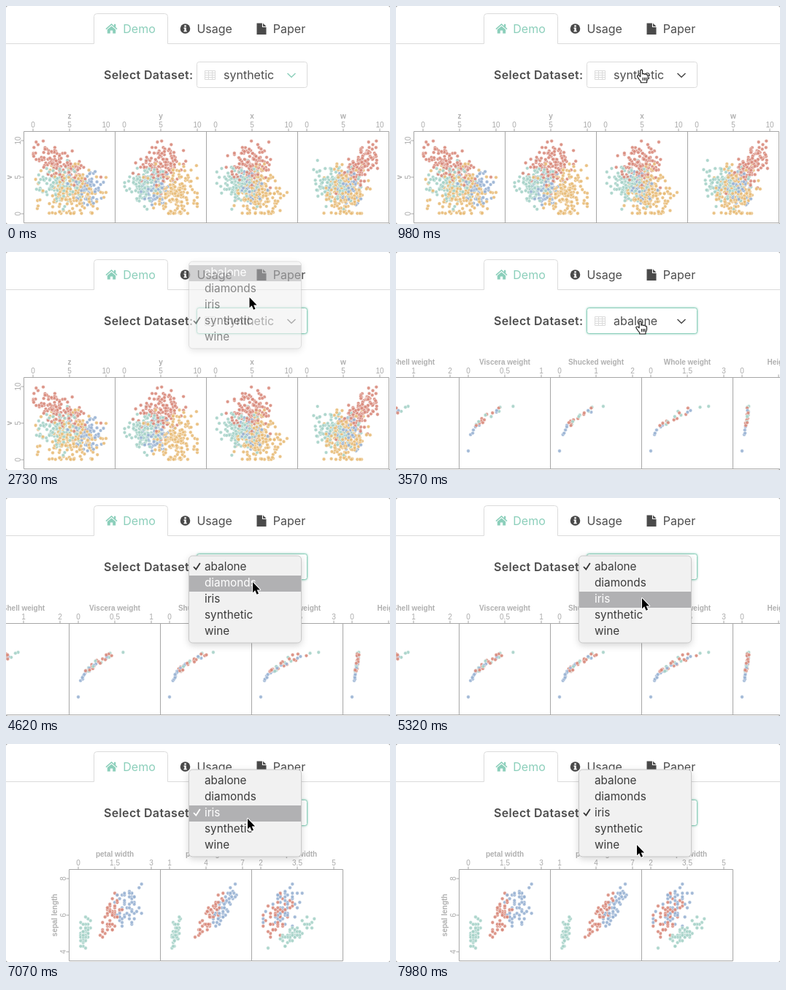
Animation of 526x298 px, one loop 8 s. Source, as an HTML page:

```html
<!DOCTYPE html>
<html lang="en">
<head>
<meta charset="utf-8">
<title>Scatterplot matrix demo</title>
<style>
  html, body { margin: 0; width: 100%; height: 100%; overflow: hidden; background: #999; }
  svg { display: block; width: 526px; height: 298px; background: #fff; border-radius: 3px; }
  text { font: 16px Inter, Roboto, sans-serif; fill: #4d4d4d; white-space: pre; }
  .bold { font-weight: 600; letter-spacing: .35px; }
  .teal { fill: #8ccfbb; }
  .mid { text-anchor: middle; }
  .dark { fill: #4a4a4a; }
  .line { fill: none; stroke: #dbdbdb; }
  .plot text { font: 10px "Liberation Sans", Arial, sans-serif; fill: #aaa; text-anchor: middle; }
  .plot .name { font-weight: 700; fill: #b0b0b0; }
  .plot path { fill: none; stroke: #a6a6a6; }
  .plot circle { stroke: #fff; stroke-width: .5; opacity: .9; }
  #menu text { font-size: 15.3px; fill: #3b3b3b; }
  #menu text.on { fill: #fff; }
  #panel { fill: #f1f1f1; stroke: #c8c8c8; filter: drop-shadow(0 3px 5px rgba(0, 0, 0, .16)); }
  #bar { fill: #b1b1b3; }
  #check { fill: none; stroke: #333; stroke-width: 1.8; }
  #check.on { stroke: #fff; }
  #box { fill: #fff; stroke: #dbdbdb; }
  #box.focus { stroke: #8ccfbb; filter: drop-shadow(0 0 1.5px #8ccfbb); }
  #chevron { fill: none; stroke: #8ccfbb; stroke-width: 1.4; }
  #chevron.hover { stroke: #444; }
</style>
</head>
<body>
<svg id="stage" viewBox="0 0 526 298">
  <!-- tabs -->
  <path class="line" d="M0 51.5H120.5V14.5Q120.5 10.5 124.5 10.5H217.5Q221.5 10.5 221.5 14.5V51.5H526"/>
  <path class="teal" d="M144.5 24L152.5 31L151.5 32.2L144.5 26.1L137.5 32.2L136.5 31L141 27.1L144.5 24ZM148 24.7H150.3V29L148 27ZM144.5 27.4L150.2 32.3V37.5H146.2V33.5H142.8V37.5H138.8V32.3Z"/>
  <text class="teal" x="160.3" y="37">Demo</text>
  <circle class="dark" cx="245.5" cy="31" r="6.8"/>
  <path fill="#fff" d="M244.3 26.3H246.8V28.4H244.3ZM243.5 29.6H246.8V33.8H247.7V35.3H243.5V33.8H244.4V31.1H243.5Z"/>
  <text x="261.4" y="37">Usage</text>
  <path class="dark" d="M343.5 23.5H350.9V28.9H356.5V39H343.5ZM352 23.5L356.5 27.9H352Z"/>
  <text x="365.8" y="37">Paper</text>

  <g id="plots"></g>

  <g id="loader">
    <rect id="loadBox" y="136" height="64" rx="4" fill="#f5f5f5"/>
    <g id="spinner"></g>
    <text id="loadText" y="174"></text>
  </g>

  <!-- dataset select -->
  <text class="bold" x="134" y="100">Select Dataset:</text>
  <rect id="box" x="261.5" y="76.5" width="151" height="35" rx="3"/>
  <path class="line" d="M272.5 88.5H286.5V100.5H272.5ZM272 91.5H287M272 94.5H287M272 97.5H287M277.5 89V101M282.5 89V101"/>
  <text id="choice" x="298" y="100"></text>
  <path id="chevron" d="M385.5 92L391 97.3L396.5 92"/>

  <g id="menu">
    <rect id="panel" x="250.5" y="0" width="154" height="119" rx="5"/>
    <rect id="bar" x="251" width="153" height="22"/>
    <path id="check" d="M257 15L260.3 18.5L265.8 10"/>
  </g>

  <g id="cursor" stroke-linejoin="round">
    <path id="arrow" fill="#000" stroke="#fff" stroke-width="2" paint-order="stroke"
      d="M0 0V14.2L3.2 11.3L5.6 16.8L8 15.8L5.7 10.4H10.1Z"/>
    <path id="hand" fill="#fff" stroke="#222" stroke-width="1.2"
      d="M-1.4 9V1.3Q0-.7 1.4 1.3V6.2Q3 5 4.2 6.6Q6 5.6 7 7.3Q9 6.8 9 9.2V12Q8.6 14.5 7.4 16V18H-.8V16.3Q-3.4 13.4-5.6 9.8Q-6 8-4.2 8Q-2.8 8-1.4 9.8ZM2 11V15M4.3 11V15M6.4 11V15"/>
  </g>
</svg>
<script>
const LOOP = 8000, STEP = 70, TOP = 171.5, SIZE = 125, PAD = 12.5;
const TEAL = '#a6d2c8', YELLOW = '#e8bc78', CORAL = '#d98a7c', BLUE = '#98b2d3';
const ITEMS = ['abalone', 'diamonds', 'iris', 'synthetic', 'wine'];
const $ = id => document.getElementById(id);

function add(parent, tag, attrs, text) {
  const el = document.createElementNS('http://www.w3.org/2000/svg', tag);
  for (const k in attrs) el.setAttribute(k, attrs[k]);
  if (text !== undefined) el.textContent = text;
  parent.appendChild(el);
  return el;
}
const show = (el, on) => { el.style.display = on ? '' : 'none'; };
const clamp = (v, a, b) => Math.min(b, Math.max(a, v));

let seed = 11;
function rand() {
  seed = (seed + 0x6D2B79F5) | 0;
  let r = Math.imul(seed ^ seed >>> 15, 1 | seed);
  r = r + Math.imul(r ^ r >>> 7, 61 | r) ^ r;
  return ((r ^ r >>> 14) >>> 0) / 4294967296;
}
const gauss = () =>
  clamp(Math.sqrt(-2 * Math.log(rand() + 1e-9)) * Math.cos(2 * Math.PI * rand()), -2.6, 2.6);

// One row: y value first, then one x value per column, each correlated with y.
function sample({ y, x, sd, corr }) {
  const g = gauss();
  return [y[0] + y[1] * g, ...x.map((m, i) =>
    m + sd[i] * (corr[i] * g + Math.sqrt(1 - corr[i] ** 2) * gauss()))];
}

// Axes with cols = [name, tick, tick, tick]; rows hold pixel offsets inside each panel.
function makePlot(x0, cols, yAxis, rows) {
  const g = add($('plots'), 'g', { class: 'plot' });
  const width = SIZE * cols.length;
  let d = `M${x0} ${TOP}h${width}M${x0} ${TOP + SIZE}h${width}`;
  for (let i = 0; i <= cols.length; i++) d += `M${x0 + i * SIZE} ${TOP}v${SIZE}`;
  cols.forEach(([name, ...ticks], i) => {
    const left = x0 + i * SIZE;
    add(g, 'text', { class: 'name', x: left + SIZE / 2, y: 154 }, name);
    ticks.forEach((tick, k) => {
      const x = left + PAD + k * 50;
      add(g, 'text', { x, y: 166 }, tick);
      d += `M${x} ${TOP}v-4`;
    });
  });
  if (yAxis) {
    const [name, ...ticks] = yAxis;
    const side = (x, y, cls, s) =>
      add(g, 'text', { class: cls, transform: `translate(${x} ${y}) rotate(-90)` }, s);
    side(x0 - 17, TOP + SIZE / 2, 'name', name);
    ticks.forEach((tick, k) => {
      const y = TOP + SIZE - PAD - k * 50;
      side(x0 - 5, y, '', tick);
      d += `M${x0} ${y}h-4`;
    });
  }
  add(g, 'path', { d });
  const marks = rows.map(({ color, off }) => {
    const row = add(g, 'g', { fill: color });
    off.slice(1).forEach((x, i) => add(row, 'circle', {
      cx: (x0 + i * SIZE + PAD + x).toFixed(1),
      cy: (TOP + SIZE - PAD - off[0]).toFixed(1), r: 2.4
    }));
    return row;
  });
  return { g, marks };
}

function syntheticRows() {
  const none = [0, 0, 0, 0];
  const blue = { color: BLUE, y: [3.5, 1], x: [7.6, 4.6, 5, 5.7], sd: [1.1, 1, 1, 1], corr: none };
  const teal = { color: TEAL, y: [4, 1.3], x: [3.9, 3, 3.3, 3.8], sd: [1.5, 1.2, 1.2, 1.4], corr: none };
  const yellow = { color: YELLOW, y: [2.9, 1.5], x: [5.2, 6.8, 5.9, 5.3], sd: [1.9, 1.6, 1.5, 1.3], corr: none };
  const coral = { color: CORAL, y: [6.4, 1.4], x: [4.2, 4.7, 4.8, 7.3], sd: [2, 1.4, 1.3, 1.2], corr: [-.7, .15, 0, .6] };
  const order = [blue, teal, yellow, coral, teal, yellow, coral, yellow];
  return Array.from({ length: 520 }, (_, i) => {
    const c = order[i % order.length];
    return { color: c.color, off: sample(c).map(v => clamp(v, .05, 10) * 10) };
  });
}

function abaloneRows() {
  const spans = [40, 54, 57, 70];
  return Array.from({ length: 40 }, (_, i) => {
    const s = i === 0 ? 0 : i < 8 ? .33 + .035 * i : .57 + .43 * ((i - 8) / 31) ** 1.4;
    const color = i < 8 ? BLUE : [TEAL, CORAL, TEAL, BLUE, CORAL][Math.floor(rand() * 5)];
    const grow = span => span * s ** 2.5 * (.7 + .45 * rand());
    return { color, off: [12 + 61 * s, ...spans.map(grow), 10 * s * (.7 + .4 * rand())] };
  }).sort(() => rand() - .5);
}

function irisRows() {
  const low = [4, 0, 1, 2], range = [4, 3, 6, 3];
  const groups = [
    { color: TEAL, y: [5.01, .35], x: [.25, 1.46, 3.43], sd: [.1, .17, .38], corr: [.28, .27, .74] },
    { color: BLUE, y: [6.59, .64], x: [2.03, 5.55, 2.97], sd: [.27, .55, .32], corr: [.28, .86, .46] },
    { color: CORAL, y: [5.94, .5], x: [1.33, 4.26, 2.77], sd: [.2, .47, .31], corr: [.55, .75, .53] }
  ];
  return Array.from({ length: 150 }, (_, i) => {
    const c = groups[i % 3];
    return {
      color: c.color,
      off: sample(c).map((v, k) =>
        (clamp(Math.round(v * 10) / 10, low[k] + .1, low[k] + range[k] - .1) - low[k]) / range[k] * 100)
    };
  });
}

// from: loading starts; ready: points begin; full: all points drawn
const sets = [
  { name: 'synthetic', from: -1, ready: -1, full: -1,
    ...makePlot(24.5, [['z', 0, 5, 10], ['y', 0, 5, 10], ['x', 0, 5, 10], ['w', 0, 5, 10]],
      ['v', 0, 5, 10], syntheticRows()) },
  { name: 'abalone', from: 2940, ready: 3150, full: 3900, size: '4177 rows and 8 columns', left: 78,
    ...makePlot(-38.5, [['Shell weight', 0, 1, 2], ['Viscera weight', 0, .5, 1],
      ['Shucked weight', 0, 1, 2], ['Whole weight', 0, 1.5, 3], ['Height', 0, '', 1]],
      null, abaloneRows()) },
  { name: 'iris', from: 5670, ready: 5880, full: 6580, size: '150 rows and 4 columns', left: 82,
    ...makePlot(86.5, [['petal width', 0, 1.5, 3], ['petal length', 1, 4, 7], ['sepal width', 2, 3.5, 5]],
      ['sepal length', 4, 6, 8], irisRows()) }
];

// picked: chosen item; blink: highlight off just before the fade
const menus = [
  { open: 1120, checked: 3, picked: 0, blink: 2520, fade: 2590, end: 2940 },
  { open: 4060, checked: 0, picked: 2, blink: 5250, fade: 5320, end: 5670 },
  { open: 6790, checked: 2, picked: 4, blink: 7980, fade: LOOP, end: LOOP + 1 }
];

const path = [
  [70, 344, -24], [700, 338, 86], [1120, 335.5, 87], [1900, 335.5, 87], [2380, 337, 26],
  [2590, 337, 26], [2730, 333.5, 62], [2940, 334, 93], [4200, 335, 95], [4550, 338, 115],
  [4700, 338, 115], [5040, 337, 137], [5320, 337, 137], [5600, 332.5, 135], [5900, 332.5, 135],
  [6500, 331, 96], [7070, 331, 102], [7280, 331, 102], [7770, 330, 138], [8000, 330, 138]
];
const handTimes = [[630, 1120], [2940, 4060], [5670, 6790]];

function cursorAt(t) {
  let i = 0;
  while (i < path.length - 2 && t >= path[i + 1][0]) i++;
  const [a, ax, ay] = path[i], [b, bx, by] = path[i + 1];
  const p = clamp((t - a) / (b - a), 0, 1), e = p * p * (3 - 2 * p);
  return [ax + (bx - ax) * e, ay + (by - ay) * e];
}

const labels = ITEMS.map((s, i) => add($('menu'), 'text', { x: 272, y: 19.6 + i * 22 }, s));
for (let i = 0; i < 8; i++) {
  const a = i * Math.PI / 4;
  add($('spinner'), 'circle', {
    cx: 6 * Math.cos(a), cy: 6 * Math.sin(a), r: 1.1 + i * .09, class: 'dark'
  });
}

function drawMenu(t, y) {
  const m = menus.find(m => t >= m.open && t < m.end);
  show($('menu'), m);
  if (!m) return;
  const top = 79 - 22 * m.checked;
  let on = Math.floor((y - top - 5) / 22);
  if (t >= m.blink) on = t < m.fade ? -1 : m.picked;
  $('menu').setAttribute('transform', `translate(0 ${top})`);
  $('menu').setAttribute('opacity', t < m.fade ? 1 : 1 - (t - m.fade) / (m.end - m.fade));
  show($('bar'), on >= 0 && on < ITEMS.length);
  $('bar').setAttribute('y', 5 + on * 22);
  labels.forEach((el, i) => el.classList.toggle('on', i === on));
  $('check').setAttribute('transform', `translate(0 ${m.checked * 22})`);
  $('check').classList.toggle('on', m.checked === on);
}

function draw(t) {
  const set = sets.filter(s => t >= s.from).pop();
  const loading = t < set.ready;
  sets.forEach(s => show(s.g, s === set));
  set.g.setAttribute('transform', `translate(0 ${loading ? 88 : 0})`);
  const share = loading ? 0 : t >= set.full ? 1 : (t - set.ready + STEP) / (set.full - set.ready + STEP);
  set.marks.forEach((row, i) => show(row, i < share * set.marks.length));

  show($('loader'), loading);
  if (loading) {
    $('loadBox').setAttribute('x', set.left);
    $('loadBox').setAttribute('width', 547 - 2 * set.left);
    $('loadText').setAttribute('x', set.left + 43);
    $('loadText').textContent = `Prerendering ${set.size}...`;
    $('spinner').setAttribute('transform',
      `translate(${set.left + 31} 168) rotate(${Math.floor(t / 125) * 45})`);
  }

  $('choice').textContent = set.name;
  $('box').classList.toggle('focus', t >= 1120);
  $('chevron').classList.toggle('hover', t >= 630);

  const [x, y] = cursorAt(t);
  drawMenu(t, y);
  const hand = handTimes.some(([a, b]) => t >= a && t < b);
  show($('hand'), hand);
  show($('arrow'), !hand);
  $('cursor').setAttribute('transform', `translate(${x} ${y})`);
}

const start = performance.now();
function tick() {
  const t = (performance.now() - start) % LOOP;
  draw(t - t % STEP);
  requestAnimationFrame(tick);
}
tick();
</script>
</body>
</html>
```
